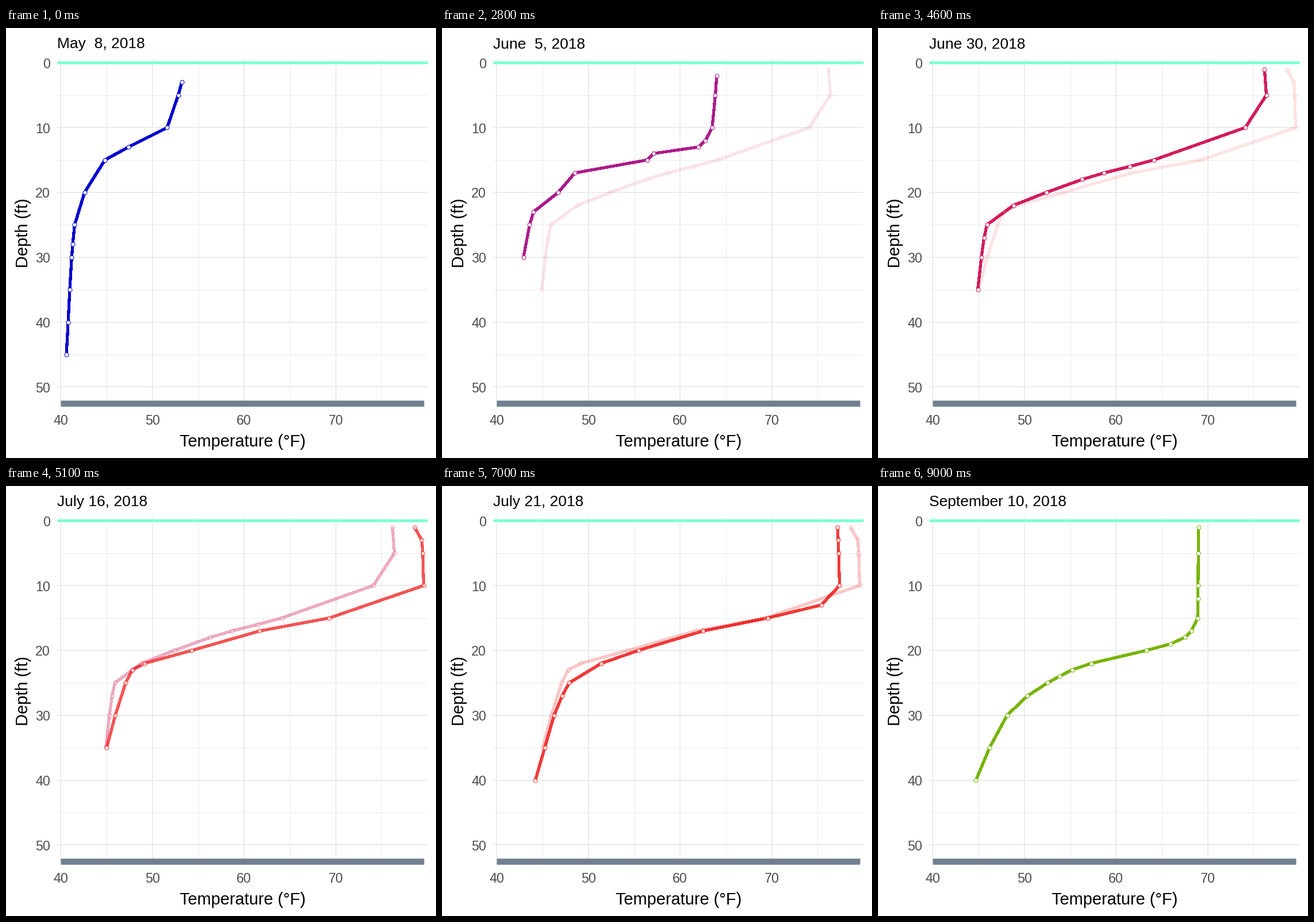
These frames come from a looping animation (748 by 748 pixels, 10 s). A matplotlib script:

```python
import matplotlib.pyplot as plt
import numpy as np
from matplotlib.animation import FuncAnimation

SIZE, DPI = 748, 100
PT = 72 / DPI                      # points per pixel
STEP_MS, LOOP_MS = 100, 10000
HOLD, FADE = 9, 9                  # steps at rest and steps of cross-fade

LEFT, RIGHT, TOP, BOTTOM = 89, 733, 54, 658
plt.rcParams["font.family"] = "Liberation Sans"


def px(temp):
    return 95.5 + (temp - 40) * 15.935


def py(depth):
    return 60.4 + depth * 11.28


fig = plt.figure(figsize=(SIZE / DPI, SIZE / DPI), dpi=DPI, facecolor="white")
ax = fig.add_axes([0, 0, 1, 1])
ax.set(xlim=(0, SIZE), ylim=(SIZE, 0))
ax.axis("off")


def rule(xs, ys, color, width, z=1):
    ax.plot(xs, ys, color=color, lw=width * PT, solid_capstyle="butt", zorder=z)


def label(x, y, text, size, color="black", **kw):
    return ax.text(x, y, text, fontsize=size * PT, color=color,
                   va="baseline", **kw)


def draw_background():
    for temp in range(40, 80, 5):
        rule([px(temp)] * 2, [TOP, BOTTOM], "#ebebeb", 1 if temp % 10 else 2)
    for depth in range(0, 55, 5):
        rule([LEFT, RIGHT], [py(depth)] * 2, "#ebebeb", 1 if depth % 10 else 2)
    rule([LEFT, RIGHT], [py(0)] * 2, "aquamarine", 5, 2)
    rule([95, 727], [652.9] * 2, "slategray", 10.6, 2)
    for temp in range(40, 80, 10):
        label(px(temp), 690, str(temp), 23.2, "#4d4d4d", ha="center")
    for depth in range(0, 60, 10):
        label(77, py(depth) + 9.4, str(depth), 23.2, "#4d4d4d", ha="right")
    label(411.5, 728, "Temperature (°F)", 29, ha="center")
    label(37.7, 356, "Depth (ft)", 29, ha="center", rotation=90,
          rotation_mode="anchor")


def monotone_cubic(x, knots):
    """Smooth curve through the knots that never overshoots them."""
    kx, ky = np.array(knots, float).T
    secant = np.diff(ky) / np.diff(kx)
    a, b = secant[:-1], secant[1:]
    same_sign = a * b > 0
    inner = np.where(same_sign, 2 * a * b / np.where(same_sign, a + b, 1), 0)
    slope = np.concatenate([secant[:1], inner, secant[-1:]])
    i = np.clip(np.searchsorted(kx, x, side="right") - 1, 0, len(secant) - 1)
    h = kx[i + 1] - kx[i]
    t = (x - kx[i]) / h
    ease = t * t * (3 - 2 * t)
    return (ky[i] * (1 - ease) + ky[i + 1] * ease
            + h * t * (1 - t) * ((1 - t) * slope[i] - t * slope[i + 1]))


class Profile:
    """One day's temperature curve, sampled every 5 ft, at knots and extras."""

    def __init__(self, date, color, *knots, extra=()):
        self.date = date
        first, last = knots[0][0], knots[-1][0]
        depths = np.array(sorted({d for d, _ in knots} | set(extra)
                                 | set(range(5, last, 5))))
        depths = depths[depths >= first]
        xs, ys = px(monotone_cubic(depths, knots)), py(depths)
        self.line, = ax.plot(xs, ys, color=color, lw=4.2 * PT, zorder=3,
                             solid_capstyle="butt", solid_joinstyle="round",
                             antialiased=False)
        self.dots, = ax.plot(xs, ys, "o", ms=7 * PT, mew=1 * PT, mfc="white",
                             mec=color, zorder=4, antialiased=False)

    def fade(self, alpha):
        for artist in (self.line, self.dots):
            artist.set_alpha(alpha)
            artist.set_visible(alpha > 0)


draw_background()
title = label(LEFT, 35, "", 26.4)

# Knots are (depth in ft, temperature in °F).
profiles = [
    Profile("May  8, 2018", "#0000cd",
            (3, 53.2), (10, 51.6), (15, 44.8), (25, 41.5), (45, 40.6),
            extra=(13, 28)),
    Profile("June  5, 2018", "#a2007e",
            (2, 64), (10, 63.5), (13, 62), (14, 57.1), (15, 56.4),
            (17, 48.5), (20, 46.7), (23, 44), (30, 42.9), extra=(12,)),
    Profile("June 30, 2018", "#ce0049",
            (1, 76.2), (5, 76.4), (10, 74.1), (15, 64.1), (18, 56.3),
            (25, 45.9), (35, 44.9), extra=(16, 17, 22, 27)),
    Profile("July 16, 2018", "#ee0000",
            (1, 78.6), (3, 79.4), (10, 79.6), (15, 69.3), (17, 61.7),
            (20, 54.3), (23, 47.8), (35, 45), extra=(22,)),
    Profile("July 21, 2018", "#ee0000",
            (1, 77.2), (10, 77.4), (13, 75.4), (17, 62.5), (25, 47.9),
            (40, 44.2), extra=(3, 22, 27)),
    Profile("September 10, 2018", "#76b500",
            (1, 69), (15, 68.9), (18, 67.5), (23, 55.2), (30, 48.1),
            (40, 44.7), extra=(12, 17, 19, 22, 24, 27)),
]


def update(frame):
    current, step = divmod(frame, HOLD + FADE)
    mix = max(0, step - HOLD) / FADE
    if current == len(profiles) - 1:
        mix = 0
    for profile in profiles:
        profile.fade(0)
    profiles[current].fade(1 - mix)
    if mix:
        profiles[current + 1].fade(mix)
    title.set_text(profiles[current + (mix > 0.5)].date)
    return []


anim = FuncAnimation(fig, update, frames=LOOP_MS // STEP_MS, interval=STEP_MS,
                     init_func=lambda: update(0), repeat=True, repeat_delay=0,
                     blit=False)
plt.show()
```
